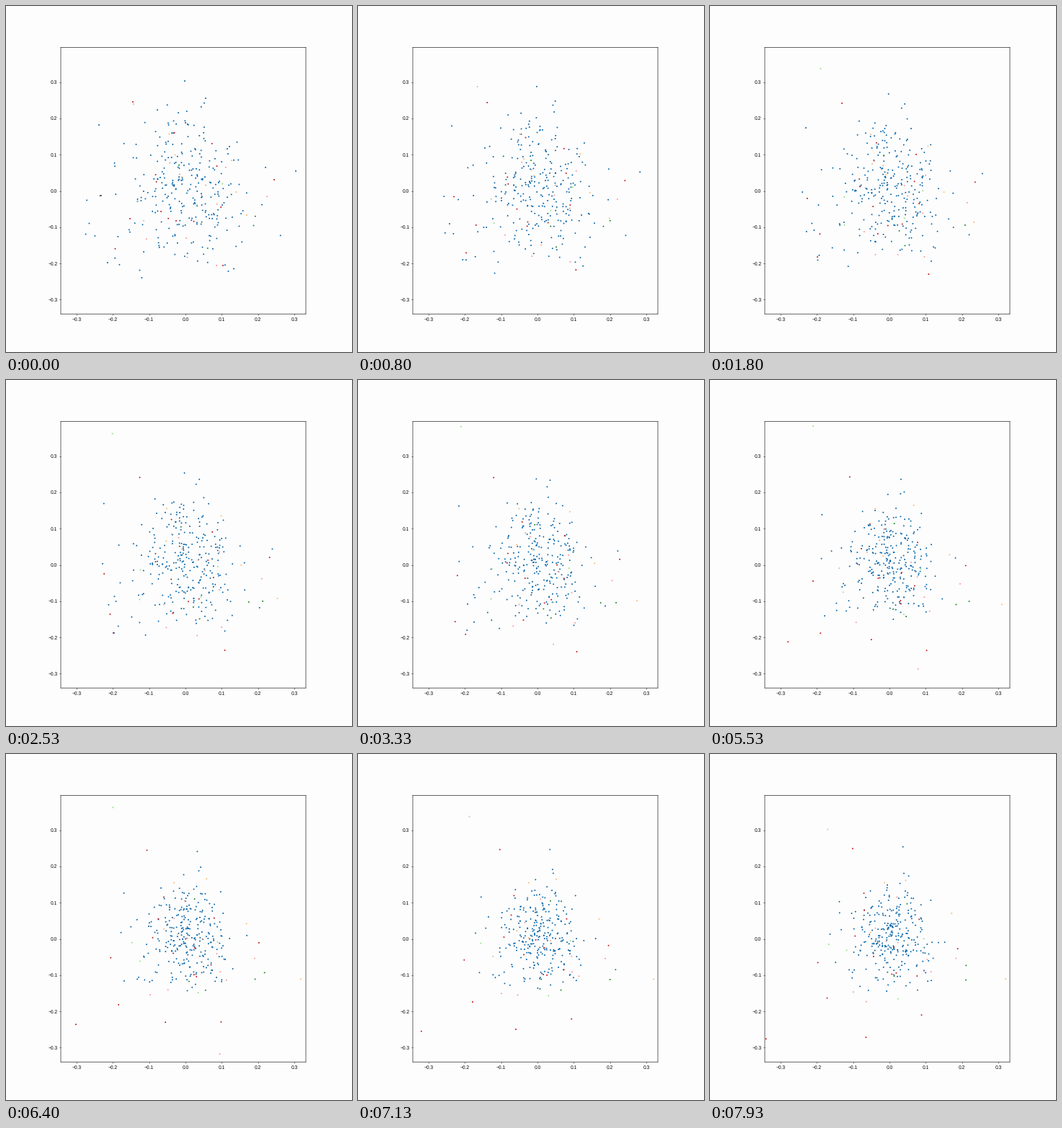
Animation of 480x480 px, one loop 8 s. Source, as a matplotlib script:

```python
import numpy as np
import matplotlib.pyplot as plt
from matplotlib.animation import FuncAnimation

SIZE, DPI = 480, 48
FRAMES, INTERVAL = 125, 64
SCALE = 503.3                      # pixels per data unit
ORIGIN = np.array([249.0, 256.5])  # pixel position of (0, 0)
LEFT, TOP, RIGHT, BOTTOM = 76.0, 57.5, 416.0, 427.2

PAPER, INK = "#fdfdfd", "#000000"
BLUE, RED, PINK = "#0c69ac", "#cc1a20", "#ff9896"
ORANGE, GREEN, LIME = "#ffb870", "#1f8a2a", "#98df8a"

# Far strays: colour, then pixel position at the start, middle and end
MIDDLE = 0.59
STRAYS = [
    (LIME, (177, 136), (141, 60), (165, 108)),
    (RED, (176, 133), (192, 135), (198, 131)),
    (RED, (172, 295), (118, 353), (76, 397)),
    (RED, (236, 298), (226, 350), (216, 395)),
    (RED, (132, 263), (141, 276), (150, 290)),
    (RED, (372, 241), (358, 254), (343, 271)),
    (RED, (301, 360), (302, 377), (293, 361)),
    (ORANGE, (334, 290), (400, 310), (410, 312)),
    (PINK, (250, 322), (282, 388), (312, 445)),
    (BLUE, (248, 104), (247, 151), (246, 183)),
    (BLUE, (277, 128), (265, 139), (268, 128)),
    (BLUE, (129, 165), (149, 182), (181, 206)),
    (BLUE, (402, 229), (347, 243), (325, 262)),
]
rng = np.random.default_rng(12)


def limit(points, radius):
    reach = np.hypot(*points.T)[:, None]
    return points * np.minimum(1, radius / reach)


def drift(n, spread, keep, jitter, radii, centres):
    """Start, bend and end of n particles on parabolic paths."""
    start = limit(rng.normal(0, spread, (n, 2)), radii[0])
    start[:, 0] *= 1 + 0.003 * start[:, 1]   # narrower towards the top
    end = limit(keep * start + rng.normal(0, jitter, (n, 2)), radii[1])
    bend = rng.normal(0, 40, (n, 2))
    return start + centres[0], bend, end + centres[1]


def through(first, middle, last):
    """Start, bend and end of parabolas passing through three points."""
    line = first + (last - first) * MIDDLE
    return first, (middle - line) / (MIDDLE * (1 - MIDDLE)), last


cloud = drift(275, (48, 49), 0.4, 23, (130, 85), [(246, 254), (252, 250)])
tinted = drift(34, (58, 44), 0.9, 24, (110, 115), [(252, 264), (250, 276)])
strays = through(*(np.array(p, float) for p in list(zip(*STRAYS))[1:]))
start, bend, end = (np.vstack(part) for part in zip(cloud, tinted, strays))

tints = [RED, PINK, ORANGE, RED, PINK, GREEN, LIME]
colors = [BLUE] * len(cloud[0])
colors += [tints[i % len(tints)] for i in range(len(tinted[0]))]
colors += [s[0] for s in STRAYS]


def to_data(px):
    return (px - ORIGIN) * (1, -1) / SCALE


def positions(u):
    return to_data(start + (end - start) * u + bend * u * (1 - u))


plt.rcParams.update({"font.family": "Liberation Sans", "text.hinting": "none"})
fig = plt.figure(figsize=(SIZE / DPI, SIZE / DPI), dpi=DPI, facecolor=PAPER)
ax = fig.add_axes([LEFT / SIZE, 1 - BOTTOM / SIZE,
                   (RIGHT - LEFT) / SIZE, (BOTTOM - TOP) / SIZE],
                  facecolor=PAPER)
(x0, y0), (x1, y1) = to_data(np.array([[LEFT, BOTTOM], [RIGHT, TOP]]))
ax.set(xlim=(x0, x1), ylim=(y0, y1))

# Unsnapped lines keep their fractional pixel positions
ticks = np.arange(-3, 4) / 10
ax.set_xticks(ticks)
ax.set_yticks(ticks)
ax.tick_params(labelsize=10, width=0.8, color=INK, labelcolor=INK)
for line in ax.get_xticklines() + ax.get_yticklines():
    line.set_snap(False)
for spine in ax.spines.values():
    spine.set(linewidth=0.9, color=INK, snap=False)

dots = ax.scatter(*positions(0).T, s=2, c=colors, linewidths=1.5, zorder=2)


def update(i):
    dots.set_offsets(positions(i / FRAMES))
    return (dots,)


anim = FuncAnimation(fig, update, frames=FRAMES, interval=INTERVAL,
                     repeat=True, repeat_delay=0)
plt.show()
```
